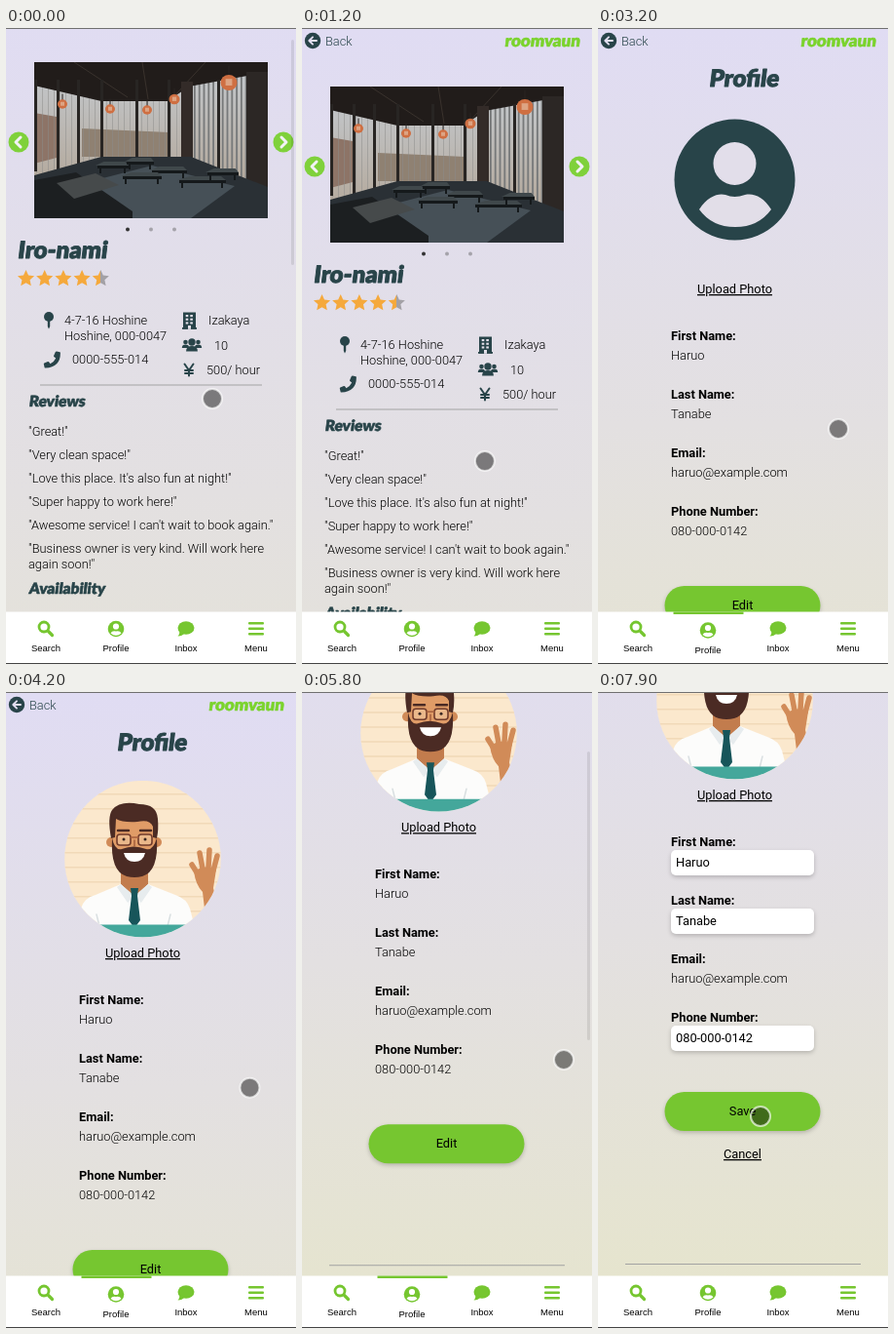
An HTML page that plays this animation: 298x652 px, repeating every 8000 ms.

```html
<!DOCTYPE html>
<html lang="en">
<head>
<meta charset="utf-8">
<style>
  html, body { margin: 0; width: 100%; height: 100%; overflow: hidden; background: #e2dfe4; }
  svg { display: block; width: 298px; height: 652px; }
  text { font: 350 12.8px Roboto, sans-serif; fill: #000; }
  .title, .sub, .logo {
    font: 900 24px Lato, sans-serif; fill: #284449; stroke: #284449; stroke-width: .9; stroke-linejoin: round;
    transform-box: fill-box; transform-origin: left bottom; transform: skewX(-7deg);
  }
  .sub { font-size: 15.5px; stroke-width: .6; }
  .logo { font-size: 17px; fill: #7ad32c; stroke: #7ad32c; stroke-width: .6; }
  .label { font-weight: 700; }
  .reg { font-weight: 400; }
  .link { font-weight: 400; text-decoration: underline; }
  .mid { text-anchor: middle; }
  .tab { font: 9.5px "Liberation Sans", Arial, sans-serif; text-anchor: middle; }
  .shadow { filter: drop-shadow(0 2px 2px rgba(0, 0, 0, .2)); }
</style>
</head>
<body>
<svg id="stage" viewBox="0 0 298 652"></svg>
<script>
const stage = document.getElementById('stage');
const text = (x, y, s, cls = '') => `<text x="${x}" y="${y}" class="${cls}">${s}</text>`;
const rect = (x, y, w, h, fill, extra = '') =>
  `<rect x="${x}" y="${y}" width="${w}" height="${h}" fill="${fill}" ${extra}/>`;
const circle = (x, y, r, fill) => `<circle cx="${x}" cy="${y}" r="${r}" fill="${fill}"/>`;
const path = (d, fill, extra = '') => `<path d="${d}" fill="${fill}" ${extra}/>`;
const line = (d, color, w, extra = '') =>
  path(d, 'none', `stroke="${color}" stroke-width="${w}" stroke-linecap="round" stroke-linejoin="round" ${extra}`);
const list = (n, f) => Array.from({ length: n }, (_, i) => f(i)).join('');
const rule = (x1, x2, y) => rect(x1, y, x2 - x1, 1, '#a3a3a3');
const backdrop = id => rect(0, -10, 298, 1020, `url(#${id})`);

const ink = '#284449', green = '#76c630';

function gradient(id, height) {
  return `<linearGradient id="${id}" gradientUnits="userSpaceOnUse" x1="0" y1="0" x2="0" y2="${height}">
    <stop stop-color="#e0dcf3"/><stop offset=".5" stop-color="#e3e0e1"/><stop offset="1" stop-color="#e6e5cb"/></linearGradient>`;
}

const header = circle(11, 13, 8.2, ink) + line('M15 13H7.5M11 9.3L7.3 13L11 16.7', '#e3dff1', 1.9) +
  `<text x="24" y="17.5" style="fill:${ink}">Back</text>` +
  '<text x="285" y="19.5" text-anchor="end" class="logo">roomvaun</text>';

function star(x, y, fill) {
  const pts = list(10, i => {
    const a = i * Math.PI / 5, r = i % 2 ? 4.3 : 9;
    return `${x + r * Math.sin(a)},${y - r * Math.cos(a)} `;
  });
  return `<polygon points="${pts}" fill="${fill}"/>`;
}

function lantern(x, y, r) {
  return line(`M${x} ${y - r * 2}V${y}`, '#2b2422', 1) +
    `<ellipse cx="${x}" cy="${y}" rx="${r}" ry="${r * .95}" fill="#cf6f42"/>` +
    rect(x - r * .4, y - r * .45, r * .8, r * .8, '#dda483');
}

function table(x, y, w) {
  return path(`M${x} ${y}l${w * .25} -4h${w * .65}l${w * .1} 4z`, '#40484b') +
    rect(x + 2, y, w - 2, 3, '#15191b') + rect(x + 4, y, 2, 8, '#15191b') + rect(x + w - 5, y, 2, 8, '#15191b');
}

function room() {
  return `<g clip-path="url(#roomBox)">` + rect(29, 60, 240, 160, '#24292d') +
    path('M29 82L98 96H168L190 84L250 72V190L190 160H100L29 180Z', 'url(#daylight)') +
    path('M29 112L52 116V158L29 164Z', '#8d7467') + path('M78 128L168 132V157H78Z', '#8f8172') +
    list(26, i => rect(31 + i * 6, 84, 1, 90, '#8b8b89', 'opacity=".5"')) +
    list(12, i => rect(193 + i * 4.8, 72, 1.8, 112, '#77797a')) +
    path('M29 60H269V70L188 85L166 100H98L29 84Z', '#211c1a') +
    path('M70 60L125 96M140 60L146 98M205 60L170 98', 'none', 'stroke="#39322d"') +
    [29, 52, 73, 97, 133, 166, 217].map(x => rect(x, 78, 3, 94, '#282523')).join('') +
    rect(180, 80, 12, 84, '#332b28') + path('M247 70H269V200L247 190Z', '#2c2725') +
    path('M29 176L98 157H190L269 188V220H29Z', '#2a3035') +
    path('M80 184L150 166L235 187L190 220H105Z', '#465057') +
    path('M29 181L72 173L130 213V220H29Z', '#1c1f21') +
    path('M52 184L92 174L116 186L70 200Z', '#464a4b') +
    table(92, 166, 34) + table(122, 162, 30) + table(148, 171, 38) +
    table(118, 177, 42) + table(176, 181, 50) + table(205, 173, 34) +
    lantern(58, 103, 5) + lantern(107, 108, 5) + lantern(145, 109, 5) +
    lantern(173, 98, 5.5) + lantern(229, 81, 8.5) + '</g>';
}

const arrow = (x, dir) => circle(x, 142, 10.5, '#7fd13b') +
  line(`M${x - 2 * dir} 137L${x + 3 * dir} 142L${x - 2 * dir} 147`, '#f3f2f6', 3);

function detailIcons() {
  const pin = circle(44, 321, 5, ink) + path('M42.8 325h2.4v6l-1.2 2.5l-1.2 -2.5z', ink);
  const phone = path('M52 356.5l3.3 .8q.6 .2 .6 .8q0 15 -15.4 15.5q-.7 0 -.9 -.6l-.8 -3.4q-.1 -.7 .5 -1l3.7 -1.5q.6 -.2 1 .2l1.5 1.9q4 -2 5.7 -5.7l-1.9 -1.5q-.5 -.4 -.2 -1l1.6 -3.8q.4 -.7 1.3 -.7z', ink);
  const building = rect(182, 316.5, 13, 17, ink) + rect(181, 332, 15, 1.8, ink) +
    list(6, i => rect(184.7 + i % 2 * 4.6, 319 + (i >> 1) * 3.7, 2.6, 2.1, '#e2dfe8')) +
    rect(187, 330, 3, 3.8, '#e2dfe8');
  const person = (x, y, r) => circle(x, y, r, ink) +
    path(`M${x - r * 1.6} ${y + r * 2.6}q0 -${r * 1.5} ${r * 1.6} -${r * 1.5}t${r * 1.6} ${r * 1.5}z`, ink);
  const people = person(184.5, 347, 2.3) + person(197.5, 347, 2.3) + person(191, 347, 3.7);
  const yen = line('M183.5 369.5L188 376L192.5 369.5M188 376V381.5M184 376H192M184 379H192', ink, 2);
  return pin + phone + building + people + yen;
}

const reviews = ['"Great!"', '"Very clean space!"', '"Love this place. It\'s also fun at night!"',
  '"Super happy to work here!"', '"Awesome service! I can\'t wait to book again."',
  '"Business owner is very kind. Will work here'];

const venue = backdrop('longFade') + header + room() + arrow(13, -1) + arrow(285, 1) +
  circle(125, 231.5, 2, '#333') + circle(149, 231.5, 2, '#a5a3aa') + circle(173, 231.5, 2, '#a5a3aa') +
  text(11, 261.5, 'Iro-nami', 'title') +
  list(5, i => star(20.5 + i * 19.2, 282, i < 4 ? '#f5a93c' : 'url(#half)')) + detailIcons() +
  text(60, 328.5, '4-7-16 Hoshine') + text(60, 344.5, 'Hoshine, 000-0047') +
  text(68, 368.5, '0000-555-014') + text(208, 328.5, 'Izakaya') + text(214, 354.5, '10') +
  text(206, 380, '500/ hour') + rule(35, 263, 390.5) + text(23, 413, 'Reviews', 'sub') +
  reviews.map((s, i) => text(23, 443 + i * 24, s)).join('') + text(23, 579, 'again soon!"') +
  text(23, 605, 'Availability', 'sub');

const placeholder = circle(140.5, 155.5, 62, ink) + circle(140.5, 139, 22, '#e2deea') +
  path('M104 186C113 172 124 169 131 171Q140 175 151 171C160 169 170 173 178 186Q165 204 141 204T104 186Z', '#e2dee8');

function portrait() {
  return `<g clip-path="url(#round)">` + rect(60, 91, 162, 162, '#fbe8cd') +
    list(9, i => rect(60, 104 + i * 15, 162, 1.5, '#f1d9b8')) +
    path('M118 178H146V202L132 214L118 202Z', '#c27c4d') +
    path('M70 253L77 222Q80 211 92 208L118 197L132 210L146 197L174 208Q186 212 189 222L197 253Z', '#fcfcfb') +
    line('M93 228L97 244M169 228L165 244', '#d9dfe1', 1.5) +
    path('M118 197L132 209L125 216L114 200ZM146 197L132 209L139 216L150 200Z', '#e7ecee') +
    path('M128 201H136L135 209L138 234L132 242L126 234L129 209Z', '#17555a') +
    circle(108, 154, 5, '#d18b58') + circle(155, 154, 5, '#d18b58') +
    path('M110 128H153V162Q152 184 132 186Q111 184 110 162Z', '#e09c67') +
    path('M108 150Q104 128 109 121Q117 111 137 115Q155 115 156 130Q157 141 155 150L151 149V138Q148 130 135 133Q120 134 113 130L112 149Z', '#4b2b24') +
    path('M109 150Q112 163 119 161Q131 156 144 161Q151 163 155 150Q157 184 140 189Q132 191 124 189Q107 184 109 150Z', '#4b2b24') +
    path('M121 165H143Q141 174 132 174T121 165Z', '#fff') +
    line('M115 142H126M138 142H149', '#4b2b24', 2.5) +
    [114, 136].map(x => rect(x, 146, 14, 11, '#eab88b', 'rx="3" stroke="#713c2c" stroke-width="1.6"') +
      circle(x + 7, 151, 1.5, '#392722')).join('') + line('M128 149H136M132 152V158', '#a65f3d', 1.5) +
    line('M196 185L191 177M202 181L199 165M208 180L209 162M213 183L217 168', '#d18b58', 5.5) +
    path('M193 184Q204 176 216 182L213 201L218 222L204 222L202 205Q195 198 193 184Z', '#d18b58') +
    rect(60, 238.5, 162, 20, '#44a79b') + '</g>';
}

const person = ['Haruo', 'Tanabe', 'haruo@example.com', '080-000-0142'];
const labels = ['First Name:', 'Last Name:', 'Email:', 'Phone Number:'];
const input = (s, y) => rect(75, y, 147, 26, '#fff', 'rx="5" class="shadow"') + text(80, y + 17, s, 'reg');
const viewing = person.map((s, i) => text(75, 340 + i * 60, s)).join('') +
  text(148.5, 596, 'Edit', 'reg mid') + rule(28, 270, 716);
const editing = person.map((s, i) => i === 2 ? text(75, 460, s) : input(s, 324 + i * 60)).join('') +
  text(148.5, 596, 'Save', 'reg mid') + text(148.5, 640, 'Cancel', 'link mid') + rule(28, 270, 748);

const profile = backdrop('shortFade') + header + text(149, 60, 'Profile', 'title mid') +
  `<g id="placeholder">${placeholder}</g><g id="portrait">${portrait()}</g>` +
  text(140.5, 272, 'Upload Photo', 'link mid') +
  labels.map((s, i) => text(75, 320 + i * 60, s, 'label')).join('') +
  rect(68.5, 572, 160, 40, green, 'rx="20" class="shadow"') +
  `<g id="viewing">${viewing}</g><g id="editing">${editing}</g>`;

const nav = rect(0, 598.5, 298, 53, '#fff') +
  `<circle cx="39" cy="614" r="5" fill="none" stroke="${green}" stroke-width="2.8"/>` +
  line('M43.5 618.5L47.5 622.5', green, 3.2) + text(41, 639, 'Search', 'tab') +
  `<g id="profileTab">` + circle(113, 616, 8.3, green) + circle(113, 613.5, 3.1, '#fff') +
  path('M107.5 620.5Q109 617.5 113 618.5Q117 617.5 118.5 620.5Q113 625 107.5 620.5Z', '#fff') +
  text(113, 639, 'Profile', 'tab') + '</g>' +
  `<ellipse cx="185" cy="615" rx="8.5" ry="6.8" fill="${green}"/>` +
  path('M178 617Q179 621 176.5 623.5Q181 623.5 184 620Z', green) + text(185, 639, 'Inbox', 'tab') +
  list(3, i => rect(249, 609 + i * 5.5, 16, 2.6, green, 'rx="1"')) + text(257, 639, 'Menu', 'tab') +
  `<g id="active">${rect(77.5, 598.5, 72, 2.5, green)}</g>`;

stage.innerHTML = '<defs>' + gradient('longFade', 1000) + gradient('shortFade', 814) +
  `<linearGradient id="half"><stop offset=".5" stop-color="#f5a93c"/><stop offset=".5" stop-color="#a3a1a6"/></linearGradient>
  <linearGradient id="daylight" x2="0" y2="1"><stop stop-color="#c3c7cb"/><stop offset="1" stop-color="#b3a799"/></linearGradient>
  <clipPath id="roomBox"><rect x="29" y="60" width="240" height="160"/></clipPath>
  <clipPath id="round"><circle cx="140.5" cy="171" r="80.3"/></clipPath></defs>
  <g id="venue">${venue}</g><g id="profile">${profile}</g>
  ${rect(293, 0, 3, 231, '#000', 'id="thumb" rx="1.5"')}<g id="nav">${nav}</g>
  ${rect(0, 0, 298, 1, '#707070')}${rect(0, 651, 298, 1, '#444')}
  <circle id="cursor" r="10" fill="rgba(0,0,0,.46)" stroke="rgba(255,255,255,.65)" stroke-width="2"/>`;

// Rows are [time, ...values]; values ease or run straight between rows.
function track(rows, t, ease = k => k) {
  const i = rows.findIndex(r => r[0] > t);
  if (i < 0) return rows[rows.length - 1].slice(1);
  if (i === 0) return rows[0].slice(1);
  const a = rows[i - 1], b = rows[i], k = ease((t - a[0]) / (b[0] - a[0]));
  return a.slice(1).map((v, j) => v + (b[j + 1] - v) * k);
}
const smooth = k => k * k * (3 - 2 * k);

const cursorPath = [[0, 212, 380], [900, 212, 380], [1800, 119, 627], [2300, 119, 627], [3100, 247, 411],
  [4000, 247, 411], [4800, 269, 377], [5900, 269, 377], [6500, 168, 434], [7100, 168, 434], [7500, 167, 435]];
const scrollPath = [[0, 25], [100, 14], [250, 3], [400, -2.5], [600, -2], [1000, 0],
  [4950, 0], [5100, 8], [5500, 80], [5900, 145], [6200, 162]];
const thumbFade = [[0, .09], [300, .09], [600, 0], [4900, 0], [5000, .09], [6200, .09], [6500, 0]];

const el = id => document.getElementById(id);
const show = (id, on) => { el(id).style.display = on ? '' : 'none'; };
const shift = (id, y) => el(id).setAttribute('transform', `translate(0 ${y})`);

function draw(now) {
  const t = Math.floor(now % 8000 / 100) * 100;
  const onProfile = t >= 2200, hasPhoto = t >= 3800, isEditing = t >= 6900;
  const active = onProfile && !isEditing;
  const [scroll] = track(scrollPath, t);
  const [x, y] = track(cursorPath, t, smooth);

  show('venue', !onProfile);
  show('profile', onProfile);
  show('placeholder', !hasPhoto);
  show('portrait', hasPhoto);
  show('viewing', !isEditing);
  show('editing', isEditing);
  show('active', active);
  shift(onProfile ? 'profile' : 'venue', -scroll);
  shift('profileTab', active ? 1.5 : 0);
  shift('nav', Math.max(0, -scroll)); // the bar follows the overscroll bounce

  const thumb = el('thumb');
  thumb.setAttribute('y', onProfile ? 3 + scroll * .45 : 12 + (scroll - 25) * .4);
  thumb.setAttribute('height', onProfile ? 296 : 231);
  thumb.setAttribute('opacity', track(thumbFade, t)[0]);
  el('cursor').setAttribute('transform', `translate(${x} ${y})`);
  requestAnimationFrame(draw);
}
requestAnimationFrame(draw);
</script>
</body>
</html>
```
